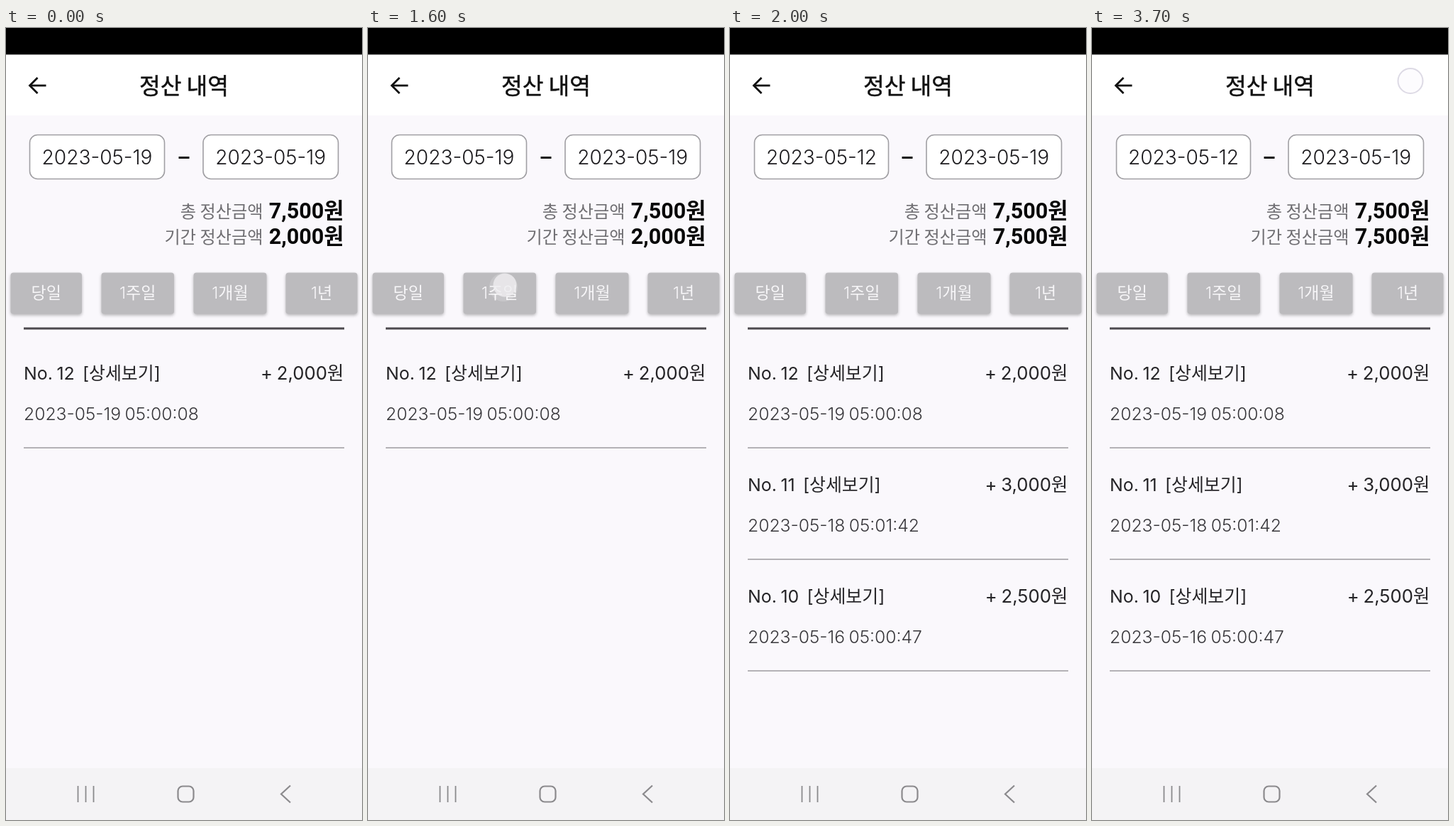
Animation of 502x1115 px, one loop 3.8 s. Source, as an HTML page with a canvas:

```html
<!DOCTYPE html>
<html lang="ko">
<head>
<meta charset="utf-8">
<title>정산 내역</title>
<style>
  html, body { margin: 0; width: 100%; height: 100%; overflow: hidden; background: #faf8fc; }
  canvas { display: block; }
</style>
</head>
<body>
<canvas id="stage" width="502" height="1115"></canvas>
<script>
const ctx = document.getElementById('stage').getContext('2d');
const LOOP = 3800;
const HANGUL = '"Noto Sans CJK KR", "Noto Sans CJK", sans-serif';
const BODY = 'Inter, ' + HANGUL;
const BOLD = 'Roboto, ' + HANGUL;

const entries = [
  ['No. 12', '2,000', '2023-05-19 05:00:08'],
  ['No. 11', '3,000', '2023-05-18 05:01:42'],
  ['No. 10', '2,500', '2023-05-16 05:00:47'],
];
const buttons = [[6.5, 100.5, '당일'], [134.5, 102.5, '1주일'], [264.5, 103, '1개월'], [394.5, 101, '1년']];

function rect(x, y, w, h, fill) {
  ctx.fillStyle = fill;
  ctx.fillRect(x, y, w, h);
}

function roundRect(x, y, w, h, r, fill, stroke, width = 1.6) {
  ctx.beginPath();
  ctx.roundRect(x, y, w, h, r);
  if (fill) { ctx.fillStyle = fill; ctx.fill(); }
  if (stroke) { ctx.strokeStyle = stroke; ctx.lineWidth = width; ctx.stroke(); }
}

function line(points, color, width) {
  ctx.beginPath();
  points.forEach(([x, y]) => ctx.lineTo(x, y));
  ctx.strokeStyle = color;
  ctx.lineWidth = width;
  ctx.stroke();
}

function circle(x, y, r, fill, stroke) {
  ctx.beginPath();
  ctx.arc(x, y, r, 0, Math.PI * 2);
  ctx.fillStyle = fill;
  ctx.fill();
  if (stroke) { ctx.strokeStyle = stroke; ctx.lineWidth = 2; ctx.stroke(); }
}

function text(str, x, y, size, weight, color, align = 'left', family = BODY) {
  ctx.font = `${weight} ${size}px ${family}`;
  ctx.textAlign = align;
  ctx.fillStyle = color;
  ctx.fillText(str, x, y);
}

function drawHeader() {
  rect(0, 37, 502, 86, '#fff');
  rect(0, 0, 502, 37.4, '#000');
  line([[34, 81], [56.5, 81]], '#111', 2.8);
  line([[44.5, 70], [33.5, 81], [44.5, 92]], '#111', 2.8);
  text('정산 내역', 251, 93, 32.3, 500, '#111', 'center', HANGUL);
  ctx.strokeStyle = '#111';
  ctx.lineWidth = 0.5;
  ctx.strokeText('정산 내역', 251, 93);
}

function drawDates(weekView) {
  const inset = weekView ? 1 : 0;
  const dateBox = (x, w, date) => {
    roundRect(x, 150.5, w, 62, 11, '#fff', '#a09fa3');
    text(date, x + w / 2, 192, 28.1, 300, '#1c1b1e', 'center');
  };
  dateBox(33.5 + inset, 190 - inset, weekView ? '2023-05-12' : '2023-05-19');
  dateBox(278 - inset, 190.5, '2023-05-19');
  rect(243.5 - inset, 181, 15, 3, '#111');
}

function drawTotals(period) {
  [['총 정산금액', '7,500원', 268], ['기간 정산금액', period, 304]].forEach(([label, sum, y]) => {
    text(label, 362.5, y - 1, 24.2, 300, '#6f6e72', 'right', HANGUL);
    text(sum, 476.5, y, 30.6, 700, '#080808', 'right', BOLD);
  });
}

function drawButtons(t) {
  buttons.forEach(([x, w, label], i) => {
    const glow = i === 1 && t === 1800;
    ctx.save();
    ctx.shadowColor = 'rgba(0,0,0,.28)';
    ctx.shadowBlur = 4;
    ctx.shadowOffsetY = 2;
    roundRect(x, 344.5, w, 58, 4, glow ? '#cbcacd' : '#bcbbbe');
    ctx.restore();
    text(label, x + w / 2, 381, 23, 300, '#f7f6f8', 'center');
  });
}

function drawEntry([name, sum, date], i) {
  const y = 495 + i * 157;
  ctx.save();
  ctx.wordSpacing = '-1.4px';
  text(name + '  [상세보기]', 25, y, 24.9, 400, '#252427');
  text('+ ' + sum + '원', 476.5, y, 25.7, 400, '#252427', 'right');
  text(date, 25, y + 57, 24.7, 300, '#38373b');
  ctx.restore();
  rect(25, y + 95.2, 452, 1.6, '#a3a2a6');
}

function drawNavigation() {
  const gray = '#8b8a8d';
  rect(0, 1042, 502, 73, '#f4f3f5');
  [101.5, 112.5, 123.5].forEach(x => line([[x, 1067], [x, 1090]], gray, 1.8));
  roundRect(242.5, 1067.5, 22, 22, 6.5, null, gray, 2.2);
  line([[401, 1066.5], [388, 1078.5], [401, 1090.5]], gray, 2.2);
}

function drawTouch(t) {
  if (t >= 1500 && t < 1800) {
    ctx.save();
    ctx.beginPath();
    ctx.roundRect(134, 344.5, 103, 58, 4);
    ctx.clip();
    if (t >= 1600) circle(191, 365, t === 1600 ? 20 : 27, 'rgba(255,255,255,.16)');
    ctx.restore();
    circle(193, 362, 16.5, 'rgba(239,238,241,.8)');
  }
  if (t >= 3600) circle(449, 74.5, 17.5, '#fdfcfe', '#dddae5');
}

function draw(t) {
  const weekView = t >= 1700;
  const loading = t === 1700;
  rect(0, 0, 502, 1115, '#faf8fc');
  drawHeader();
  drawDates(weekView);
  drawTotals(t >= 1800 ? '7,500원' : '2,000원');
  drawButtons(t);
  rect(25, 421.5, 452, 3, '#4c494e');
  if (loading) rect(251.5, 432, 7, 7, '#4da3ee');
  else entries.slice(0, weekView ? 3 : 1).forEach(drawEntry);
  drawNavigation();
  drawTouch(t);
}

// The screen advances in 100 ms ticks.
function tick() {
  draw(Math.floor(performance.now() % LOOP / 100) * 100);
  requestAnimationFrame(tick);
}
tick();
</script>
</body>
</html>
```
